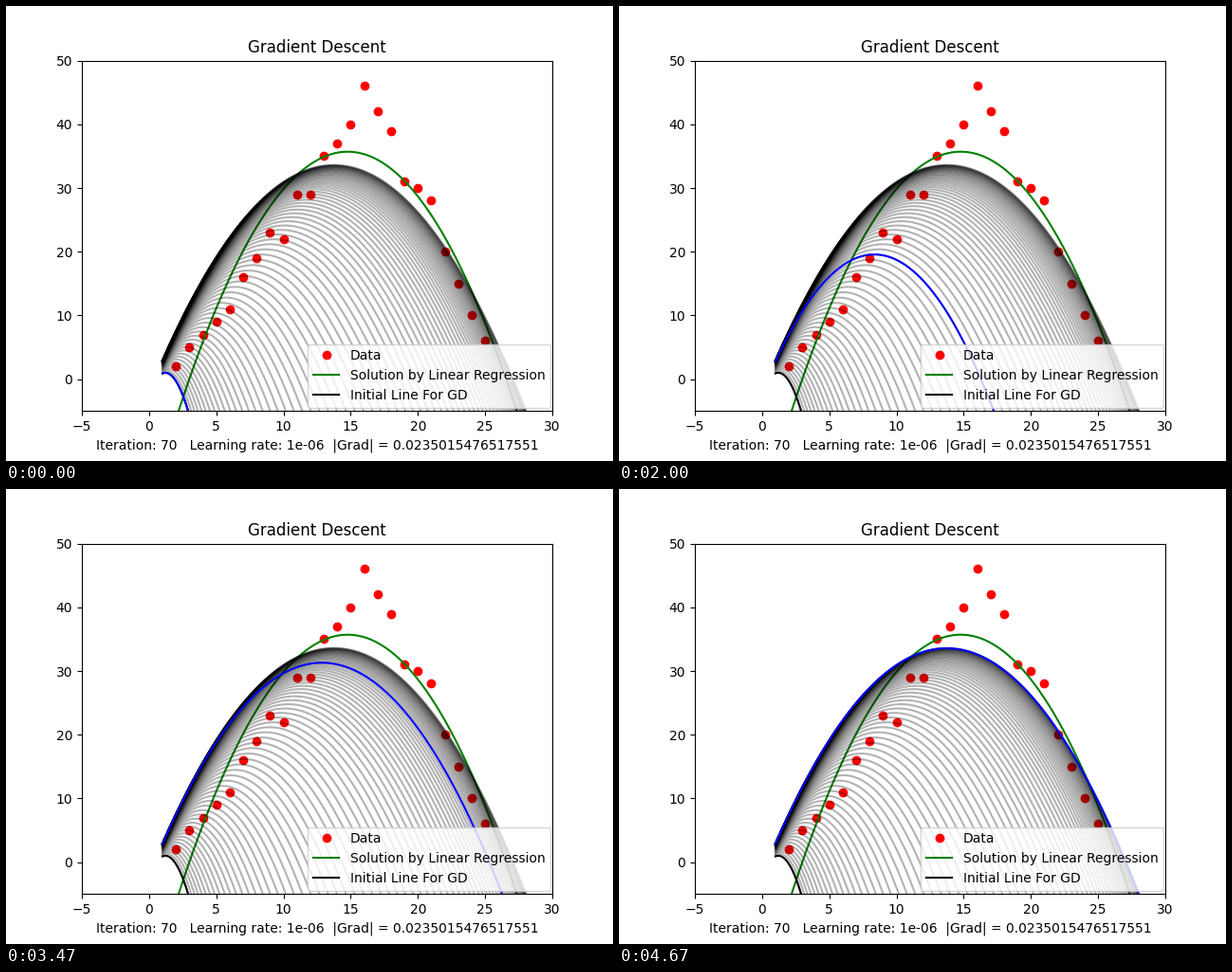
Write a matplotlib script that moves like this. It is 640x480 px and loops after 4740 ms.

```python
import numpy as np
import matplotlib.pyplot as plt
from matplotlib.animation import FuncAnimation

LOOP_MS = 4740
STEPS = 70
RATE = 1e-6

# Data points and design matrix of the quadratic model
xs = np.arange(2, 26)
ys = np.array([2, 5, 7, 9, 11, 16, 19, 23, 22, 29, 29, 35,
               37, 40, 46, 42, 39, 31, 30, 28, 20, 15, 10, 6])


def design(x):
    return np.vander(x, 3, increasing=True).astype(float)


def descend(start, steps):
    """All coefficient vectors visited by gradient descent."""
    A = design(xs)
    path = [np.array(start)]
    for _ in range(steps):
        grad = A.T @ (A @ path[-1] - ys) / len(xs)
        path.append(path[-1] - RATE * grad)
    return path


x0 = np.linspace(1, 30, 400)
basis = design(x0)
best = np.linalg.lstsq(design(xs), ys, rcond=None)[0]
curves = [basis @ c for c in descend([-2.1, 5.1, -2.1], STEPS)]

plt.rcParams["font.family"] = "DejaVu Sans"
fig, ax = plt.subplots(figsize=(6.4, 4.8), dpi=100)
ax.set(xlim=(-5, 30), ylim=(-5, 50), title="Gradient Descent")
ax.set_xlabel(f"Iteration: {STEPS}   Learning rate: {RATE}  "
              "|Grad| = 0.0235015476517551")

ax.plot(xs, ys, "ro", label="Data")
ax.plot(x0, basis @ best, color="green", label="Solution by Linear Regression")
ax.plot(x0, curves[0], color="black", label="Initial Line For GD")
for y in curves:
    ax.plot(x0, y, color="black", alpha=0.3)
current, = ax.plot(x0, curves[0], color="blue")
ax.legend(loc=(0.48, 0.01))


def update(i):
    current.set_ydata(curves[i])
    return current,


anim = FuncAnimation(fig, update, frames=len(curves),
                     interval=LOOP_MS / len(curves), repeat=True,
                     repeat_delay=0)
plt.show()
```
